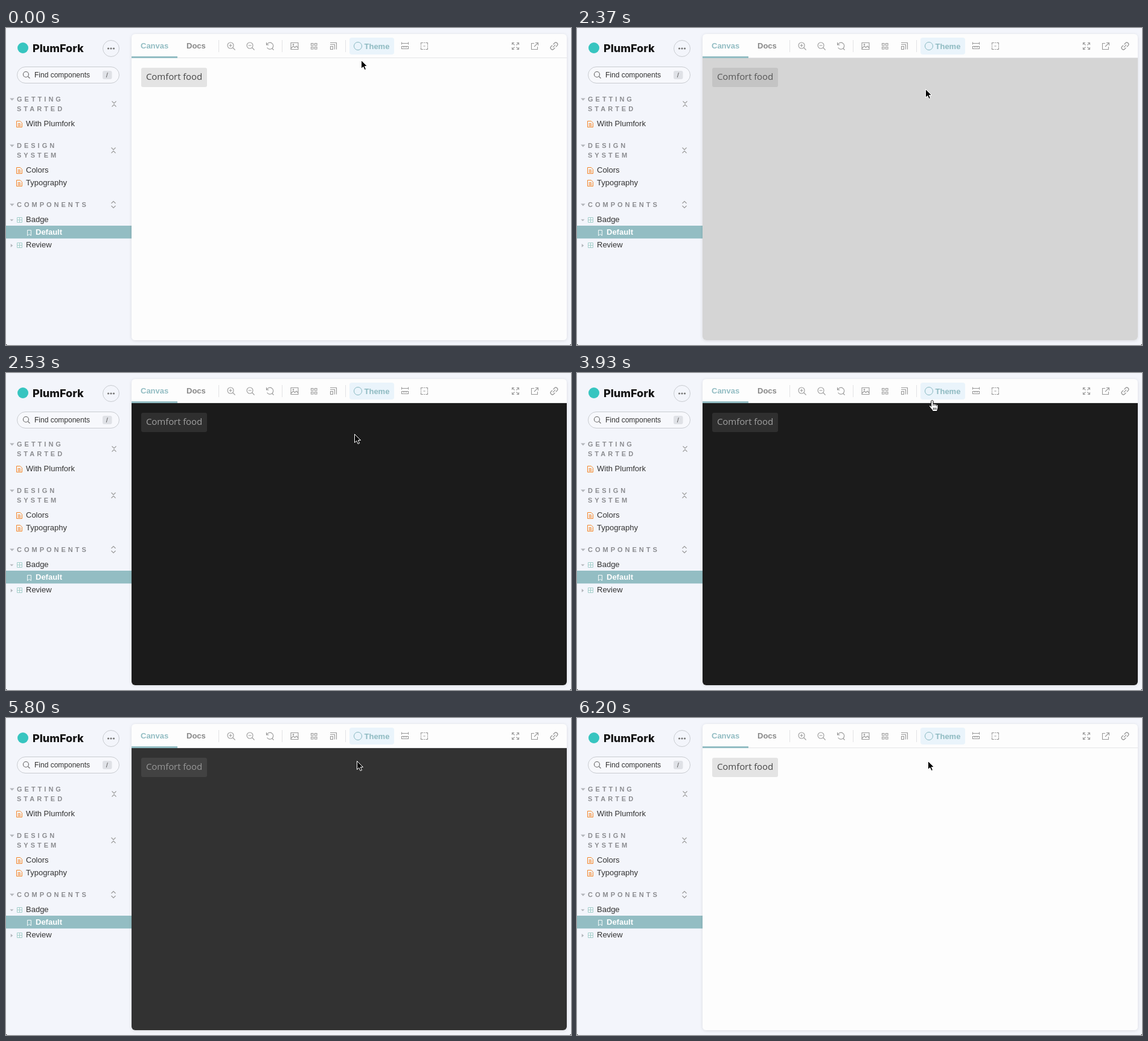
These frames come from a looping animation (936 by 526 pixels, 6660 ms). An HTML page:

```html
<!DOCTYPE html>
<html lang="en">
<head>
<meta charset="utf-8">
<title>Theme switcher</title>
<style>
  html, body { margin: 0; width: 100%; height: 100%; overflow: hidden; background: #f3f5fb; }
  svg { display: block; width: 936px; height: 526px; font: 13px "Liberation Sans", Arial, sans-serif; fill: #333; }
  .b { font-weight: 700; }
  .s { font-size: 12px; }
  .head { font-weight: 700; font-size: 11px; letter-spacing: 4px; fill: #8b8c90; }
  .line { fill: none; stroke: #999; stroke-width: 1.1; }
  .caret { fill: #b3b6bb; }
  .teal { fill: #93bdc3; }
  .brand { font: 800 18px Inter, sans-serif; fill: #151515; }
  .badge { font: 15px "Open Sans", "Noto Sans", sans-serif; letter-spacing: -.1px; }
</style>
</head>
<body>
<svg viewBox="0 0 936 526">
  <defs>
    <filter id="soft" x="-5%" y="-5%" width="110%" height="110%">
      <feDropShadow dx="0" dy="1" stdDeviation="2.5" flood-opacity=".11"/>
    </filter>
    <filter id="lift" x="-15%" y="-30%" width="130%" height="170%">
      <feDropShadow dx="0" dy="1" stdDeviation="1.5" flood-opacity=".12"/>
      <feDropShadow dx="0" dy="4" stdDeviation="4" flood-opacity=".07"/>
    </filter>
    <clipPath id="menuClip"><rect x="524" y="58" width="180" height="64" rx="14"/></clipPath>
    <g id="doc" fill="none" stroke="#f5862a">
      <path d="M.5 .5H6.5L9.5 3.5V10.5H.5Z"/><path d="M2.5 4.5H7M2.5 6.5H7.5M2.5 8.5H7.5"/>
    </g>
    <path id="cells" d="M.5 .5H8.5V8.5H.5ZM4.5 .5V8.5M.5 4.5H8.5" fill="none" stroke="#a3cfca"/>
    <path id="collapse" class="line" d="M-3.5 -4.5L0 -1L3.5 -4.5M-3.5 4.5L0 1L3.5 4.5"/>
    <path id="expand" class="line" d="M-3.5 -2L0 -5.5L3.5 -2M-3.5 2L0 5.5L3.5 2"/>
    <path id="down" class="caret" d="M-3.8 -2H3.8L0 2Z"/>
    <g id="lens" class="line" stroke-width="1.2"><circle cx="-1" cy="-1" r="5"/><path d="M2.7 2.7L6.5 6.5"/></g>
  </defs>

  <rect width="936" height="526" fill="#f3f5fb"/>
  <path d="M0 524.5V526H2ZM936 524.5V526H934Z" fill="#222"/>

  <!-- sidebar -->
  <circle cx="28" cy="33" r="9" fill="#37c5c0"/>
  <text class="brand" x="44" y="39.5">PlumFork</text>
  <circle cx="174" cy="34" r="13.5" fill="none" stroke="#c9ccd1"/>
  <g fill="#777"><circle cx="169.5" cy="34" r="1.6"/><circle cx="174" cy="34" r="1.6"/><circle cx="178.5" cy="34" r="1.6"/></g>
  <rect x="18.500" y="64.500" width="169" height="27" rx="13.500" fill="#f7f8fc" stroke="#c9ccd1"/>
  <g class="line" style="stroke:#666"><circle cx="33" cy="77" r="4.500"/><path d="M36.300 80.300L39.500 83.500"/></g>
  <text class="s" x="47" y="82">Find components</text>
  <rect x="160" y="71" width="15.500" height="14" rx="3" fill="#dfe1e6"/>
  <text x="165.800" y="82" font-size="11" fill="#555">/</text>

  <use href="#down" x="10" y="118.500"/>
  <text class="head"><tspan x="18" y="122">GETTING</tspan><tspan x="18" y="138">STARTED</tspan></text>
  <use href="#collapse" x="179" y="126"/>
  <use href="#doc" x="17" y="154"/><text x="33" y="163">With Plumfork</text>

  <use href="#down" x="10" y="195.500"/>
  <text class="head"><tspan x="18" y="199">DESIGN</tspan><tspan x="18" y="215">SYSTEM</tspan></text>
  <use href="#collapse" x="178" y="203"/>
  <use href="#doc" x="17" y="231"/><text x="33" y="240">Colors</text>
  <use href="#doc" x="17" y="252"/><text x="33" y="261">Typography</text>

  <use href="#down" x="10" y="293.500"/>
  <text class="head" x="18" y="297">COMPONENTS</text>
  <use href="#expand" x="178" y="293"/>
  <use href="#down" transform="translate(9.500 319) scale(.8)"/>
  <use href="#cells" x="18" y="314"/><text x="33" y="322">Badge</text>
  <rect class="teal" y="328" width="208" height="21.300"/>
  <path d="M35.500 335.500H41.500V344.500L38.500 342L35.500 344.500Z" fill="none" stroke="#f4fafa"/>
  <text class="b" x="49" y="343" fill="#fff">Default</text>
  <path class="caret" d="M7.800 358L11.300 361L7.800 364Z"/>
  <use href="#cells" x="18" y="356"/><text x="33" y="364">Review</text>

  <!-- panel -->
  <rect x="208" y="10" width="721" height="508" rx="6" fill="#fdfdfd" filter="url(#soft)"/>
  <path id="preview" d="M208 50H929V512A6 6 0 0 1 923 518H214A6 6 0 0 1 208 512Z"/>
  <rect id="badge" x="224" y="66" width="109" height="32" rx="3"/>
  <text id="label" class="badge" x="232" y="86">Comfort food</text>

  <!-- toolbar -->
  <rect x="208" y="49" width="721" height="1" fill="#e4e5e7"/>
  <rect class="teal" x="208" y="47" width="76" height="3"/>
  <text class="b teal" x="223" y="34">Canvas</text>
  <text class="b" x="299" y="34" fill="#888">Docs</text>
  <path d="M352.500 20V40M457.500 20V40M562.500 20V40" stroke="#e2e3e5"/>
  <rect x="569" y="16" width="74" height="28" rx="4" fill="#eaf4fb"/>
  <circle cx="583" cy="30" r="6.500" fill="none" stroke="#86b8c1"/>
  <text class="b" x="593.500" y="35" fill="#8ebac1">Theme</text>
  <use href="#lens" x="373" y="30"/><use href="#lens" x="405" y="30"/>
  <g class="line">
    <path d="M369.500 29H374.500M372 26.500V31.500M401.500 29H406.500"/>
    <path d="M431.500 24V28H435.500M432 28A5.500 5.500 0 1 1 432.500 32.500M440.500 33.500L443.500 36.500"/>
    <path d="M472 24.500H484V35.500H472ZM472 34L476 30L478.500 32.500L481 30L484 33"/><circle cx="476" cy="27.500" r=".8"/>
    <path d="M505.500 25.500h3.500v3.500h-3.500zM511.500 25.500h3.500v3.500h-3.500zM505.500 31.500h3.500v3.500h-3.500zM511.500 31.500h3.500v3.500h-3.500z"/>
    <path d="M537 24.500H547.500V35.500M537 27.500H544.500V35.500M537.500 30.500H541.500V35.500H537.500Z"/>
    <path d="M655 25.500H667M655.500 23.500V27.500M666.500 23.500V27.500M655.500 30.500H666.500V34.500H655.500ZM658.500 30.500V32.500M661 30.500V32.500M663.500 30.500V32.500"/>
    <path d="M687.500 28V24.500H691M695 24.500H698.500V28M698.500 32V35.500H695M691 35.500H687.500V32M692 24.500H694M692 35.500H694M687.500 29V31M698.500 29V31M691.500 30H694.500"/>
    <path d="M838.500 28V24.500H842M846 24.500H849.500V28M849.500 32V35.500H846M842 35.500H838.500V32M839 25L842.500 28.500M849 25L845.500 28.500M849 35L845.500 31.500M839 35L842.500 31.500"/>
    <path d="M875 25.500H870.500V35.500H880.500V31M877 24.500H881.500V29M881 25L875 31"/>
    <g transform="rotate(-45 908 30)" stroke-width="1.300">
      <path d="M907 27H904A3 3 0 0 0 904 33H907M909 27H912A3 3 0 0 1 912 33H909M905 30H911"/>
    </g>
  </g>

  <g id="menu">
    <path d="M524 72A14 14 0 0 1 538 58H598L606 51L614 58H690A14 14 0 0 1 704 72V108A14 14 0 0 1 690 122H538A14 14 0 0 1 524 108Z" fill="#fafafc" filter="url(#lift)"/>
    <rect id="hover" x="524" width="180" height="32" fill="#eff4fa" clip-path="url(#menuClip)"/>
    <text id="light" class="s" x="539" y="78">light</text>
    <text id="dark" class="s" x="539" y="110">dark</text>
  </g>

  <path id="arrow" d="M0 0V14L3.300 11L5.500 16L8 15L5.800 10H10Z" fill="#000" stroke="#fff"/>
  <g id="hand">
    <path d="M1.200 9V.8C1.200 -1.700 4.600 -1.700 4.600 .8V5C5.500 4 7.200 4.300 7.500 5.400C8.500 4.700 9.800 5.100 10.100 6.200C11.200 5.700 12.500 6.400 12.500 7.800V11C12.500 13 11.200 14 11.200 17H3.700C3.500 14.500 1 13 -1.500 9.500C-2.700 7.700 -.7 6.500 .4 8Z" fill="#fff" stroke="#000" stroke-linejoin="round"/>
    <path d="M4.600 5V8M7.500 5.500V8M10.100 6.500V8.500M5 11V14.500M7.200 11V14.500M9.400 11V14.500" fill="none" stroke="#000" stroke-width=".9"/>
  </g>
</svg>
<script>
const LOOP = 6660, FADE = 200;
const TO_DARK = 2342, TO_LIGHT = 5780;
const menuTimes = [[830, 2300], [4520, 5740]];
// time, x, y of the pointer tip
const path = [
  [30, 588, 53], [450, 587, 42], [900, 587, 42], [1320, 577, 101], [2780, 577, 101],
  [3380, 585, 46], [4600, 585, 46], [5000, 582, 68], [5070, 582, 69], [5170, 581, 71]
];
const $ = id => document.getElementById(id);
const mix = (a, b, k) => a + (b - a) * k;
const clamp = v => Math.min(1, Math.max(0, v));
const gray = v => { const c = Math.round(v); return `rgb(${c},${c},${c})`; };
const show = (el, on) => el.setAttribute("visibility", on ? "visible" : "hidden");

// cubic-bezier(.25, .1, .25, 1)
function ease(x) {
  let lo = 0, hi = 1;
  for (let i = 0; i < 20; i++) {
    const s = (lo + hi) / 2;
    if (.75 * s * (1 - s) + s ** 3 < x) lo = s; else hi = s;
  }
  return .3 * lo * (1 - lo) ** 2 + 3 * lo * lo * (1 - lo) + lo ** 3;
}

function pointerAt(t) {
  const i = path.findIndex(p => p[0] > t);
  if (i === 0) return path[0].slice(1);
  if (i < 0) return path[path.length - 1].slice(1);
  const [t0, x0, y0] = path[i - 1], [t1, x1, y1] = path[i];
  const u = (t - t0) / (t1 - t0), k = u * u * (3 - 2 * u);
  return [mix(x0, x1, k), mix(y0, y1, k)];
}

function markItem(id, active) {
  $(id).setAttribute("fill", active ? "#ff2e7e" : "#333");
  $(id).setAttribute("font-weight", active ? 700 : 400);
}

function draw(t) {
  const fade = start => ease(clamp((t - start) / FADE));
  const darkness = fade(TO_DARK) - fade(TO_LIGHT);
  $("preview").setAttribute("fill", gray(mix(253, 27, darkness)));
  $("badge").setAttribute("fill", gray(mix(228, 47, darkness)));
  $("label").setAttribute("fill", gray(mix(72, 160, darkness)));

  const open = menuTimes.some(([a, b]) => t >= a && t < b);
  const [x, y] = pointerAt(t);
  show($("menu"), open);
  show($("hover"), open && y >= 58);
  $("hover").setAttribute("y", y < 90 ? 58 : 90);
  const isDark = t >= TO_DARK && t < TO_LIGHT;
  markItem("light", !isDark);
  markItem("dark", isDark);

  const pointing = y <= 46 || (open && y >= 58);
  show($("hand"), pointing);
  show($("arrow"), !pointing);
  for (const id of ["hand", "arrow"])
    $(id).setAttribute("transform", `translate(${Math.round(x) + .5} ${Math.round(y) + .5})`);
}

const began = performance.now();
function tick() {
  draw((performance.now() - began) % LOOP);
  requestAnimationFrame(tick);
}
tick();
</script>
</body>
</html>
```
